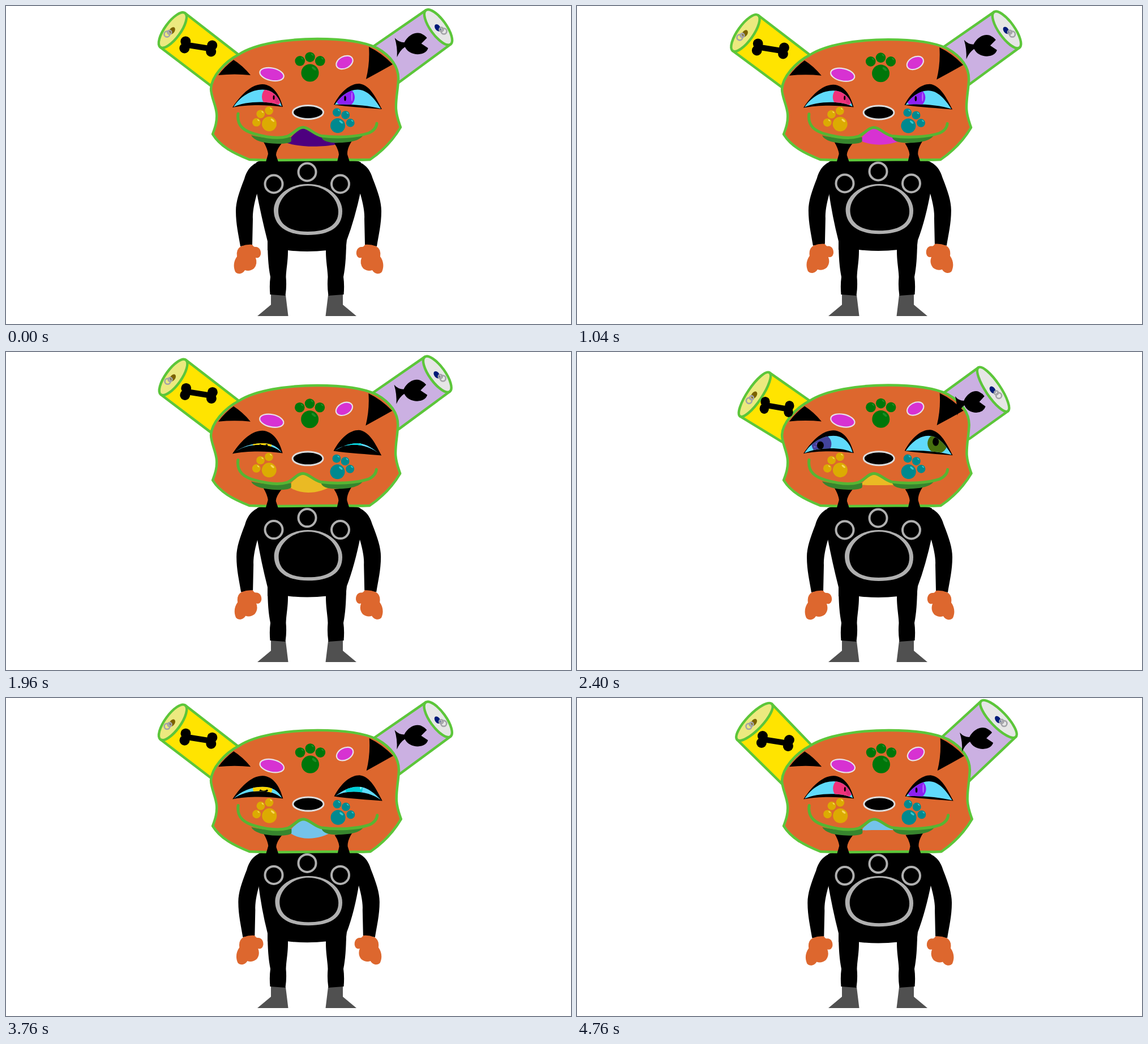
Animation of 998x561 px, one loop 4800 ms. Source, as an HTML page:

```html
<!DOCTYPE html>
<html lang="en">
<head>
<meta charset="utf-8">
<title>Can-eared cat</title>
<style>
html, body { margin: 0; width: 100%; height: 100%; overflow: hidden; background: #fff; }
svg { display: block; width: 100%; height: 100%; }
.line { stroke: #5cc63a; stroke-width: 4.4; stroke-linejoin: round; }
.ring { fill: none; stroke: #b0b0b0; stroke-width: 4; }
.tab { fill: none; stroke: #a3a3a8; stroke-width: 2.6; }
.oval { fill: #d732d2; stroke: #e8dfe8; stroke-width: 2.2; }
</style>
</head>
<body>
<svg viewBox="0 0 998 561" preserveAspectRatio="none">
  <defs>
    <clipPath id="clipL"><path id="cutL"/></clipPath>
    <clipPath id="clipR"><path id="cutR"/></clipPath>
    <g id="leg">
      <path d="M468 508L494 510L498.500 547H444L468 527Z" fill="#505050"/>
      <path d="M462 408H498V433C498 450 495 464 494.500 478Q496 495 493.500 511L466.500 509Q465 492 467 478C463 458 462 435 462 408Z"/>
    </g>
    <g id="arm">
      <path d="M450 274C433 278 425 291 421 305C412 328 406 345 406 362C406 385 411 405 414 424L435 421L436 376Q435 360 443 332L465 300Z"/>
      <path d="M415 424Q425 420 435 421Q437 425 440 425C447 424 451 431 450 438Q448 446 441 444Q445 455 438 463Q430 469 422 466C419 472 410 475 405 469C401 460 402 450 408 442Q406 429 415 424Z" fill="#dd672e"/>
    </g>
  </defs>

  <g id="earL">
    <path class="line can" fill="#ffe400"/>
    <ellipse class="line lid" fill="#ece97f"/>
    <ellipse class="hole" rx="4.500" ry="7" fill="#7b6200"/>
    <circle class="tab" r="3.500"/><circle class="tab" r="5"/>
  </g>
  <g id="earR">
    <path class="line can" fill="#cbb0e2"/>
    <ellipse class="line lid" fill="#e6e6e6"/>
    <ellipse class="hole" rx="4.500" ry="7" fill="#001a78"/>
    <circle class="tab" r="3.500"/><circle class="tab" r="5"/>
  </g>

  <use href="#leg"/>
  <use href="#leg" transform="translate(1063 0) scale(-1 1)"/>
  <path id="torso"/>
  <use id="armL" href="#arm"/>
  <use id="armR" href="#arm"/>
  <g id="toes">
    <circle class="ring" cx="532" cy="293" r="15.500"/>
    <circle class="ring" cx="473" cy="314" r="15.500"/>
    <circle class="ring" cx="590.500" cy="314" r="15.500"/>
  </g>
  <g id="pad">
    <path d="M533 314C570 314 594 338 594 362C594 390 572 404 533 404C496 404 473 388 473 360C473 338 497 314 533 314Z" fill="#b0b0b0"/>
    <path d="M533 317C565 317 587 340 587 363C587 387 566 398 533 398C502 398 481 386 481 361C481 340 503 317 533 317Z"/>
  </g>

  <g id="head">
    <path class="line" fill="#dd672e" d="M412 85C440 67 495 58 550 58C595 58 632 63 655 74C680 88 694 108 693 130C692 150 688 165 689 182C690 196 694 205 697 214C684 236 665 256 643 271Q620 272 590 271L480 272Q455 272 430 271C400 259 378 247 365 226C370 213 373 203 372 190C371 175 362 160 362 146C363 125 385 99 412 85Z"/>
    <path d="M402 95Q418 105 432 122Q404 119 375 122Q386 107 402 95ZM641 72Q664 83 683 103Q660 116 636 129Q643 101 641 72Z"/>
    <ellipse class="oval" rx="21.500" ry="11" transform="translate(469.500 120.500) rotate(12)"/>
    <ellipse class="oval" rx="15.500" ry="10.500" transform="translate(598 99.500) rotate(-27)"/>
    <g id="paws"></g>
    <ellipse cx="533.500" cy="187.500" rx="27" ry="12" stroke="#dcdcdc" stroke-width="3"/>
    <path id="mouth"/>
    <path d="M455 240H489Q477 254 477 263L481 275H459L463 261Q462 252 455 240ZM580 242L611 238Q602 252 603 262L607 275H585L588 262Q587 252 580 242Z"/>
    <path d="M433 228Q465 236 504 231V238Q503 243 480 243Q440 242 433 228ZM557 231Q595 234 632 226Q627 237 605 240Q561 245 557 231Z" fill="#37852e"/>
    <path d="M410 190C407 212 422 221 440 226C465 233 483 234 497 230C509 225 515 214 525 214C536 215 542 225 556 229C585 233 620 231 641 224Q654 218 655 207" fill="none" stroke="#57b533" stroke-width="5" stroke-linecap="round"/>
    <path d="M400 179C418 152 436 138 453 138C472 139 483 156 489 178C460 174 425 174 400 179Z"/>
    <path d="M579 174C592 150 608 137 624 137C643 139 654 163 664 182C640 180 605 178 579 174Z"/>
    <g clip-path="url(#clipL)">
      <rect x="395" y="130" width="100" height="60" fill="#60dafb"/>
      <g class="look"><circle cx="470" cy="160" r="18" fill="#f0327a"/><ellipse cx="479" cy="160" rx="5" ry="12" fill="#d92b78"/><ellipse cx="473" cy="161.500" rx="1.500" ry="4"/></g>
      <g class="look"><circle cx="453" cy="160" r="17" fill="#ffd500"/><ellipse cx="465" cy="153" rx="2" ry="5" fill="#fff08a"/><path d="M448 163Q455 168 462 163" fill="none" stroke="#000" stroke-width="3"/></g>
      <g class="look"><circle cx="432" cy="162" r="17.500" fill="#42439b"/><path d="M423 162h.1M420 167h.1" stroke="#7a55bd" stroke-width="3" stroke-linecap="round"/><ellipse cx="430" cy="164.500" rx="6" ry="7"/></g>
    </g>
    <g clip-path="url(#clipR)">
      <rect x="570" y="130" width="100" height="60" fill="#60dafb"/>
      <g class="look"><circle cx="599" cy="161" r="17" fill="#8c1ff2"/><ellipse cx="611" cy="160" rx="1.200" ry="8" fill="#b46bff"/><ellipse cx="599" cy="163" rx="1.800" ry="4.500"/></g>
      <g class="look"><circle cx="614" cy="161" r="15" fill="#00cfd8"/><ellipse cx="626" cy="156" rx="1.700" ry="6" fill="#8df4f5"/><circle cx="612" cy="152.500" r="2.200"/></g>
      <g class="look"><circle cx="637" cy="161" r="17.500" fill="#47700f"/><ellipse cx="634" cy="158" rx="5.500" ry="7.500"/></g>
    </g>
  </g>

  <g id="markL">
    <path d="M-22 -3L22 4" stroke="#000" stroke-width="10"/>
    <circle cx="-23" cy="-9" r="9"/><circle cx="-25" cy="3" r="9"/>
    <circle cx="24" cy="-2" r="9"/><circle cx="22" cy="9" r="9"/>
  </g>
  <path id="markR" d="M-37 -10Q-30 -2 -20 -2C-13 -16 0 -21 9 -18Q16 -15 20 -10L10 0L22 8Q19 18 4 19C-6 19 -15 14 -19 6Q-28 12 -33 24Q-32 6 -37 -10Z"/>
</svg>
<script>
const LOOP = 4800, STEP = 40, BEAT = 960, TAU = Math.PI * 2;
const $ = id => document.getElementById(id);
const set = (el, attrs) => { for (const k in attrs) el.setAttribute(k, attrs[k]); };
const mix = (a, b, k) => a + (b - a) * k;
const ease = k => k * k * (3 - 2 * k);
const clamp = k => Math.max(0, Math.min(1, k));

// A paw print: one pad and three toes fanned around the tilt
function paw(x, y, r, tilt, fill, shine) {
  const dot = (x, y, r) => `<circle cx="${x}" cy="${y}" r="${r}" fill="${fill}"/>
    <ellipse rx="${r * .3}" ry="${r * .13}" fill="${shine}" transform="translate(${x + r * .45} ${y - r * .5}) rotate(40)"/>`;
  const toes = [-41, 0, 41].map(spread => {
    const a = (tilt + spread) * TAU / 360;
    return dot(x + Math.sin(a) * r * 1.75, y - Math.cos(a) * r * 1.8, r * .57);
  });
  $('paws').innerHTML += dot(x, y, r) + toes.join('');
}
paw(537, 118, 15.5, 0, '#00760a', '#1d8d27');
paw(465, 208, 13, -42, '#dcab02', '#f8d85c');
paw(586, 211, 13, 37, '#00898f', '#35cbd0');

// The rim starts at (x, y) and slides by (dx, dy) as the can is pushed in
function drawEar(side, s, x, y, dx, dy, t) {
  const stretch = ((1 + Math.cos(TAU * (t + 35) / BEAT)) / 2) ** 1.3;
  const push = 1 - stretch;
  const tip = t > LOOP - BEAT / 2 - 35 ? stretch : 0;
  x += dx * push - s * 19.5 * tip;
  y += dy * push;
  const half = 37 + 9.5 * push + 7 * tip;
  const angle = s * (54 + 2 * push - 8 * tip), rad = angle * TAU / 360;
  const ex = s * half * Math.cos(rad), ey = s * half * Math.sin(rad);
  const outer = 528 + s * 166, inner = 528 + s * (117 - 6 * tip);
  const tabX = s * 10, tabY = 7 + 4 * push + tip;
  const ear = $('ear' + side);
  const [ring, loop] = ear.querySelectorAll('.tab');

  set(ear.querySelector('.can'), {
    d: `M${x + ex} ${y + ey}L${outer} ${137.5 - s * 3 + 18 * push + 11 * tip}l${-s * 25} 15
      L${inner - s * 25} ${95 - s * 6}L${inner} ${80 - s * 6}L${x - ex} ${y - ey}Z`
  });
  set(ear.querySelector('.lid'), { rx: half, ry: 14 - push, transform: `translate(${x} ${y}) rotate(${angle})` });
  set(ear.querySelector('.hole'), { transform: `translate(${x - 1} ${y + 1}) rotate(${-s * 35})` });
  set(ring, { cx: x + tabX * .55, cy: y + tabY * .55 });
  set(loop, { cx: x + tabX, cy: y + tabY });

  const markX = x + 3 - s * 43 * (1 - .15 * push - .2 * tip), markY = y + 29 - 7 * push + 5 * tip;
  set($('mark' + side), { transform: `translate(${markX} ${markY}) scale(${1 - .09 * push} 1)` });
}

function drawBody(t) {
  const dip = Math.cos(TAU * t / BEAT) ** 8;
  const up = (1 - dip) * (1.2 - .25 * Math.sin(TAU * t / LOOP));
  const low = 431 - 1.7 * up;
  set($('torso'), {
    d: `M${442 + 3.5 * up} 276Q446 273 455 273H614Q623 273 ${627 - 3 * up} 276V325Q616 376 602 413
      L600 ${low}H567Q532 ${low + 4} 498 ${low}H462V415Q451 372 ${442 + 3.5 * up} 325Z`
  });
  set($('armL'), { transform: `translate(${4.4 * up} ${-2 * up})` });
  set($('armR'), { transform: `translate(${1069 - 3.2 * up} ${-2 * up}) scale(-1 1)` });
  set($('toes'), { transform: `translate(0 ${-1.6 * up})` });
  set($('pad'), { transform: `translate(594 315) scale(${1 - .02 * up} ${1 - .03 * up}) translate(-594 -315)` });
}

// Irises glance in, ahead and out; a blink hides each swap
function drawEyes(t) {
  const turn = (t - 440) / 800, near = Math.round(turn);
  const look = Math.round(1 - Math.cos(turn * TAU / 6));
  document.querySelectorAll('.look').forEach((el, i) => set(el, { display: i % 3 === look ? 'inline' : 'none' }));

  const away = near % 3 ? Math.abs(turn - near) * 800 : LOOP;
  const shut = 1 - ease(clamp((away - 60) / 170));
  const top = mix(147.5, 161, shut), low = mix(167, 158, shut), side = mix(159, 168, shut);
  set($('cutL'), { d: `M402 178C414 ${side} 434 ${top} 453 ${top}C470 ${top} 482 ${side} 487 177C470 ${low} 425 ${low} 402 178Z` });
  set($('cutR'), { d: `M581 174C591 ${side} 606 ${top} 621 ${top}C638 ${top} 651 ${side + 4} 662 181C640 ${low + 8 - 7 * shut} 600 ${low + 5 - 6 * shut} 581 174Z` });
}

const tongues = ['#4d007f', '#d732d2', '#eaba24', '#14282e', '#74c3ea'];
const changes = [280, 1960, 2680, 3360];

function drawMouth(t) {
  const open = Math.sin(Math.PI * (t - 1520) / 180) ** 2;
  const i = changes.filter(c => c <= t).length;
  const [left, right] = i ? [497, 579] : [483, 612];
  const bend = 233 + 20 * open;
  set($('mouth'), {
    fill: tongues[i],
    d: `M525 213Q512 222 503 232L${left} 234C${left + 16} ${bend} ${right - 26} ${bend} ${right} 234L558 230Q542 222 525 213Z`
  });
}

function drawHead(t) {
  const swell = -Math.sin(TAU * t / 5600);
  set($('head'), { transform: `translate(365 271) scale(${1 + .003 * swell} ${1 + .006 * swell}) translate(-365 -271)` });
  drawEyes(t);
  drawMouth(t);
}

function frame(now) {
  const t = Math.floor(now % LOOP / STEP) * STEP;
  drawEar('L', -1, 294, 42, 20, 33, t);
  drawEar('R', 1, 764, 37, -29, 29, t);
  drawBody(t);
  drawHead(t);
}

const start = performance.now();
(function tick() {
  frame(performance.now() - start);
  requestAnimationFrame(tick);
})();
</script>
</body>
</html>
```
